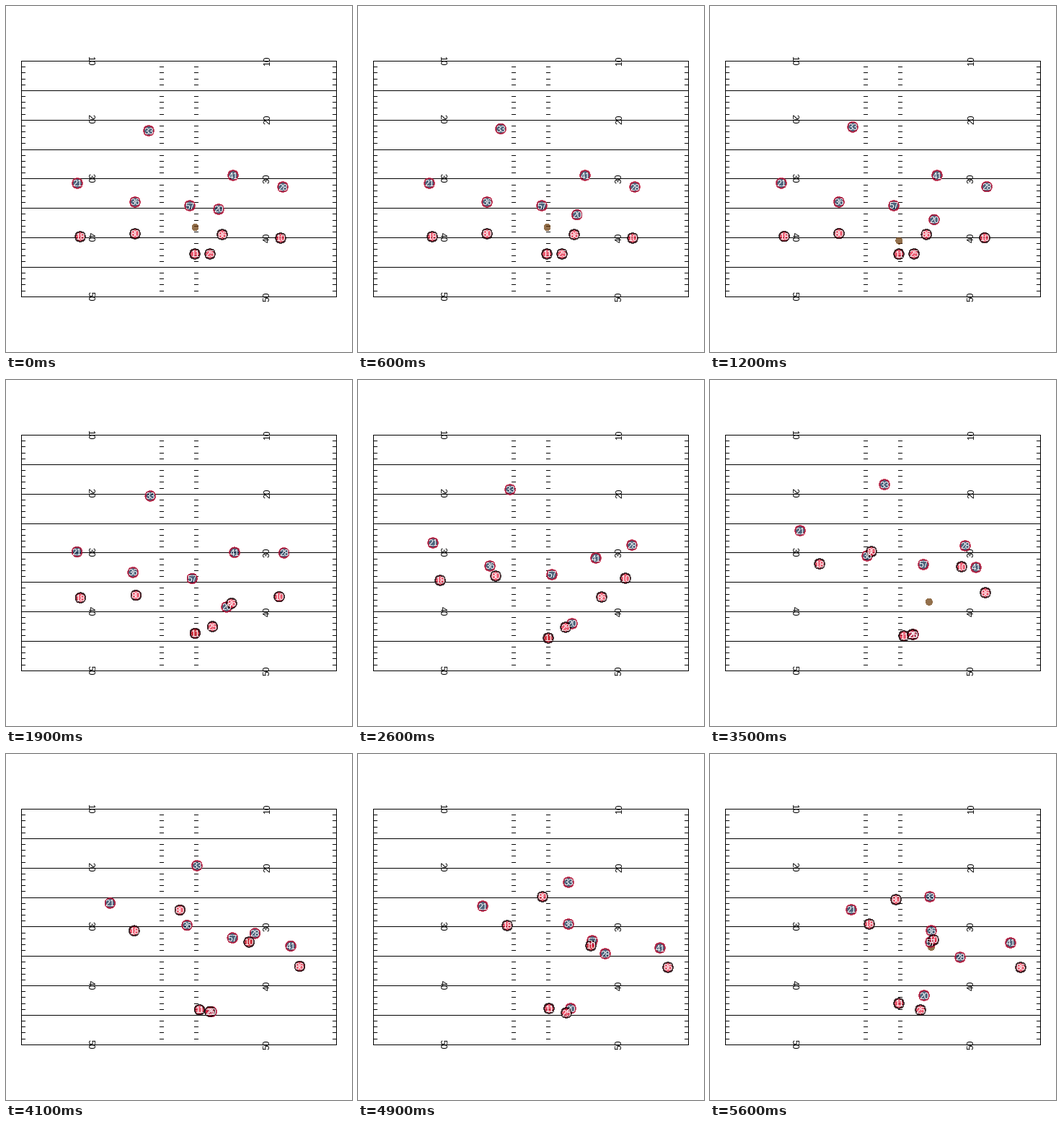
A matplotlib script for the animation above (5.7 s loop, 480 by 480 pixels).

```python
import numpy as np
import matplotlib.pyplot as plt
from matplotlib.animation import FuncAnimation
from matplotlib.colors import to_rgba
from matplotlib.patches import Circle

SIZE, DPI, FRAMES, STEP = 480, 80, 57, 100
PX = 72 / DPI  # one pixel in points
LEFT, RIGHT, TOP, YARD = 21, 458, 76, 8.17
ALPHA = 0.7
AWAY = ("#002244", "#c60c30")
HOME = ("#e31837", "black")
BROWN = "#663300"
SNAP, THROW, CATCH, DIVE, END = 11, 31, 39, 49, 56
KEYS = np.array([SNAP, 26, 35, DIVE, END], float)

fig = plt.figure(figsize=(SIZE / DPI, SIZE / DPI), dpi=DPI, facecolor="white")
ax = fig.add_axes([0, 0, 1, 1])
ax.set(xlim=(0, SIZE), ylim=(SIZE, 0))
ax.axis("off")


def line(x0, y0, x1, y1):
    ax.plot([x0, x1], [y0, y1], color="black", lw=PX, zorder=1,
            solid_capstyle="projecting")


def label(x, y, text, color, **kw):
    return ax.text(x, y, text, fontsize=12 * PX, color=color, ha="center",
                   va="center_baseline", rotation_mode="anchor",
                   family="Liberation Sans", **kw)


def disc(radius, fill, edge, lw, zorder):
    return ax.add_patch(Circle((0, 0), radius, fc=to_rgba(fill, ALPHA),
                               ec=to_rgba(edge, ALPHA), lw=lw, zorder=zorder,
                               antialiased=False))


def draw_field():
    bottom = TOP + 40 * YARD
    for x in (LEFT, RIGHT):
        line(x, TOP, x, bottom)
    for yard in range(41):
        y = TOP + yard * YARD
        if yard % 5 == 0:
            line(LEFT, y, RIGHT, y)
        else:
            for x in (LEFT, 213, 261, RIGHT - 5):
                line(x, y, x + 5, y)
        if yard % 10 == 0:
            mark = str(10 + yard)
            label(118, y - 0.5, mark, "black", rotation=270, zorder=2)
            label(361.5, y, mark, "black", rotation=90, zorder=2)


class Player:
    """Waits for the snap, then runs a smooth curve through its waypoints."""

    def __init__(self, number, team, *route, creep=(0, 0)):
        self.route = np.array(route, float)
        self.speed = np.gradient(self.route, KEYS, axis=0)
        self.speed[0] = 0
        self.creep = np.array(creep)
        self.dot = disc(6.75, *team, PX, 5 if team is HOME else 4)
        self.text = label(0, 0, str(number), "white", zorder=6)

    def at(self, t):
        if t <= SNAP:
            return self.route[0] - self.creep * (1 - t / SNAP)
        i = min(np.searchsorted(KEYS, t, side="right"), len(KEYS) - 1) - 1
        (p, q), (v, w) = self.route[i:i + 2], self.speed[i:i + 2]
        h = KEYS[i + 1] - KEYS[i]
        u = (t - KEYS[i]) / h
        return (p + (q - p) * u * u * (3 - 2 * u)
                + h * u * (1 - u) * (v * (1 - u) - w * u))

    def move(self, t):
        self.dot.center = self.at(t)
        self.text.set_position(self.at(t))


draw_field()
passer = Player(11, HOME, (262, 344), (264, 358), (269, 355), (265, 353), (262, 346))
catcher = Player(10, HOME, (381, 322), (371, 275), (349, 259), (323, 266), (310, 258))
players = [
    passer,
    catcher,
    Player(18, HOME, (103, 320), (114, 278), (152, 255), (207, 238), (221, 236)),
    Player(80, HOME, (179, 316), (191, 272), (224, 238), (256, 198), (258, 202)),
    Player(86, HOME, (300, 317), (338, 301), (382, 295), (430, 296), (431, 296)),
    Player(25, HOME, (283, 344), (288, 343), (281, 353), (289, 359), (292, 355)),
    Player(21, AWAY, (99, 246), (104, 226), (125, 209), (173, 211), (196, 216)),
    Player(36, AWAY, (179, 272), (183, 258), (218, 244), (292, 236), (307, 245)),
    Player(57, AWAY, (255, 277), (269, 270), (296, 256), (325, 259), (306, 261)),
    Player(41, AWAY, (315, 235), (330, 247), (369, 260), (419, 269), (417, 262)),
    Player(28, AWAY, (384, 251), (380, 229), (354, 230), (343, 277), (347, 282)),
    Player(33, AWAY, (198, 168), (211, 152), (242, 145), (292, 178), (305, 198),
           creep=(0, -5)),
    Player(20, AWAY, (311, 296), (297, 338), (282, 353), (295, 353), (297, 335),
           creep=(16, 14)),
]
ball = disc(4.5, BROWN, BROWN, 0, 3)
spot, down = np.array([262.5, 307]), np.array([307, 268])


def ball_at(t):
    def leg(a, b, start, stop):
        return a + (b - a) * np.clip((t - start) / (stop - start), 0, 1)

    if t < THROW:
        return leg(spot, passer.at(t), SNAP - 1, SNAP + 3)
    if t < CATCH:
        return leg(passer.at(THROW), catcher.at(CATCH), THROW, CATCH)
    return leg(catcher.at(t), down, DIVE, END)


def update(t):
    for p in players:
        p.move(t)
    ball.center = ball_at(t)
    return [ball]


anim = FuncAnimation(fig, update, frames=FRAMES, interval=STEP, repeat=True,
                     repeat_delay=0, blit=False)
plt.show()
```
